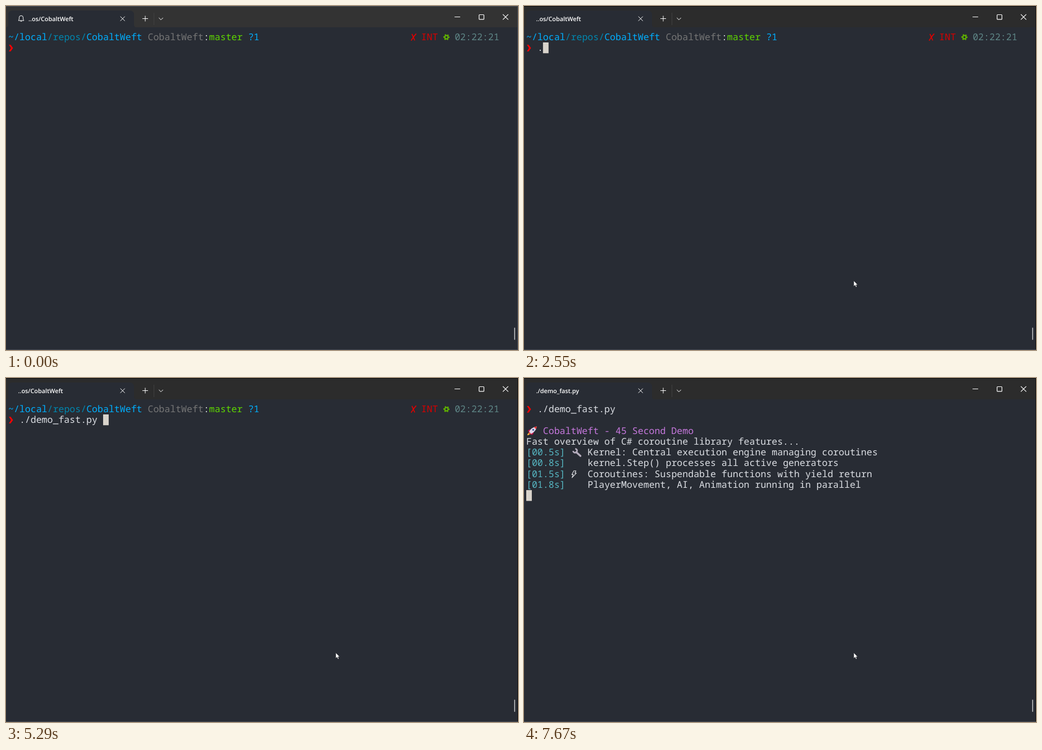
Animation, 912 px wide and 614 px high, one loop 8 s. Source, as an HTML page:

```html
<!DOCTYPE html>
<html lang="en">
<head>
<meta charset="utf-8">
<title>Terminal demo</title>
<style>
  html, body { margin: 0; width: 100%; height: 100%; overflow: hidden; background: #282c34; }
  svg { display: block; width: 912px; height: 614px; }
  text { text-rendering: geometricPrecision; white-space: pre; }
  .mono { font: 500 16.57px "Noto Sans Mono", "DejaVu Sans Mono", monospace; }
  .tab { font: 600 10.8px "Open Sans", "Noto Sans", sans-serif; fill: #fff; }
  .line { fill: none; stroke: #fff; stroke-width: 1; }
</style>
</head>
<body>
<svg id="stage" viewBox="0 0 912 614" xmlns="http://www.w3.org/2000/svg">
  <defs>
    <path id="chevron" d="M1.2 4.2H4.3L8.5 10.1L4.3 16H1.2L4.9 10.1Z" fill="#f00"/>
    <g id="rocket">
      <path d="M3.2 14.6Q1.8 16 2 18Q4.4 18 6.6 15.6L5 13.6Z" fill="#fcb13f"/>
      <path d="M8 7.4Q4.8 7 2.6 10.8L6 11.2Z" fill="#ca0b4a"/>
      <path d="M13 12.2Q13.6 15.4 9.6 17.8L9 14.2Z" fill="#ca0b4a"/>
      <path d="M5 12Q8.6 3.8 18.6 2.2Q17.6 11 8.6 15.6Z" fill="#e1d8ec"/>
      <path d="M13.8 3.6Q16 2.4 18.6 2.2Q18.4 4.8 17.2 7Z" fill="#f8312f"/>
      <circle cx="12.4" cy="8.2" r="1.8" fill="#46619a"/>
      <path d="M4.6 11.4L9.2 16L7.4 16.4L4.2 13.2Z" fill="#f8312f"/>
    </g>
    <g id="wrench" fill="none" stroke="#b4acbc">
      <path d="M9.4 9.4L17 16.2" stroke-width="3.4" stroke-linecap="round"/>
      <path d="M7.7 3.4A3.5 3.5 0 1 1 4 7.2" stroke-width="2.8"/>
    </g>
    <path id="bolt" d="M5.2 4.2H9L7.2 8.2H9.8L2 16.4L4.3 10.9H1.7Z" fill="none" stroke="#e6e8ec" stroke-width="1.1" stroke-linejoin="round"/>
    <path id="cross" d="M3.4 4.2L8.4 15.8M11 3.6Q6.4 8.6 2 16" fill="none" stroke="#e00000" stroke-width="1.7"/>
    <g id="gear" stroke="#5faf00" fill="none">
      <circle cx="5.2" cy="10" r="3" stroke-width="2.3"/>
      <circle cx="5.2" cy="10" r="4.7" stroke-width="1.8" stroke-dasharray="2.46 2.46" transform="rotate(-15 5.2 10)"/>
    </g>
  </defs>

  <rect width="912" height="614" fill="#282c34"/>
  <rect id="bar" width="912" height="38"/>
  <path d="M0 38Q4 38 4 33V16Q4 8 12 8H220Q228 8 228 16V33Q228 38 232 38Z" fill="#282c34"/>
  <path d="M0 613.5H912" stroke="#454a54"/>
  <path id="edge" d="M0 .5H911.5V613" fill="none"/>
  <path d="M263.5 12V34" stroke="#404040"/>
  <g class="line">
    <path id="bell" d="M22.2 26H31.8L30.6 23.6V20.8A3.6 3.6 0 0 0 23.4 20.8V23.6ZM25.5 26.4A1.6 1.6 0 0 0 28.5 26.4"/>
    <path d="M203.7 18.7L211.7 26.7M211.7 18.7L203.7 26.7"/>
    <path d="M243 22.5H253M248 17.5V27.5"/>
    <path d="M272.3 21L276 24.7L279.7 21"/>
    <path d="M799 19.5H809"/>
    <rect x="842.7" y="15.5" width="8.6" height="8.4" rx="1" stroke-width="1.2"/>
    <path d="M885 14.8L894.6 24.4M894.6 14.8L885 24.4" stroke-width="1.2"/>
  </g>
  <text id="title" class="tab" y="27"></text>
  <rect x="905" y="574" width="2" height="22" rx="1" fill="#a0a2a6"/>
  <g id="screen" class="mono"></g>
  <rect id="caret" width="9.94" height="19.3" fill="#d8d3cb"/>
  <path id="mouse" d="M0 0V10.2L2.4 8L4 11.6L5.7 10.8L4.2 7.4H7.2Z" fill="#fff" stroke="#15171b" stroke-width=".6"/>
</svg>
<script>
const NS = "http://www.w3.org/2000/svg";
const LOOP = 8000, FOCUS = 740, RUN = 5950;
const CELL_W = 9.94, CELL_H = 19.3, LEFT = 4, TOP = 45.7;
const NAME = "CobaltWeft";
const WHITE = "#dcdfe4", BLUE = "#00afff", DIM = "#0087af", CYAN = "#56b6c2";

const $ = id => document.getElementById(id);
const colX = c => LEFT + c * CELL_W;
const rowY = r => TOP + r * CELL_H;
const show = (el, on) => el.setAttribute("visibility", on ? "visible" : "hidden");

function add(parent, tag, attrs = {}) {
  const el = document.createElementNS(NS, tag);
  for (const k in attrs) el.setAttribute(k, attrs[k]);
  return parent.appendChild(el);
}

function write(parent, row, col, str, fill) {
  const el = add(parent, "text", { x: colX(col), y: rowY(row) + 15.2, fill });
  el.textContent = str;
  return el;
}

function icon(parent, row, col, id) {
  add(parent, "use", { href: "#" + id, transform: `translate(${colX(col)} ${rowY(row)})` });
}

// Groups that are visible from one time to another
const blocks = [];
function block(from, to, build) {
  const g = add($("screen"), "g");
  build(g);
  blocks.push({ g, from, to });
}

let command;
block(0, RUN, g => {
  let col = 0;
  const run = [["~/local", BLUE], ["/repos/", DIM], [NAME, BLUE], [" ", DIM],
    [NAME, "#767676"], [":", WHITE], ["master", "#5fd700"], [" ", DIM], ["?1", BLUE]];
  for (const [str, fill] of run) {
    write(g, 0, col, str, fill);
    col += str.length;
  }
  icon(g, 0, 72, "cross");
  write(g, 0, 74, "INT", "#d70000");
  icon(g, 0, 78, "gear");
  write(g, 0, 80, "02:22:21", "#5f8787");
  icon(g, 1, 0, "chevron");
  command = write(g, 1, 2, "", WHITE);
});

block(RUN, LOOP, g => {
  icon(g, 0, 0, "chevron");
  write(g, 0, 2, "./demo_fast.py", WHITE);
  icon(g, 2, 0, "rocket");
  write(g, 2, 3, NAME + " - 45 Second Demo", "#c678dd");
  write(g, 3, 0, "Fast overview of C# coroutine library features...", WHITE);
});

const log = [
  [6550, "00.5s", "Kernel: Central execution engine managing coroutines", "wrench"],
  [6760, "00.8s", "kernel.Step() processes all active generators"],
  [7400, "01.5s", "Coroutines: Suspendable functions with yield return", "bolt"],
  [7670, "01.8s", "PlayerMovement, AI, Animation running in parallel"]
];
log.forEach(([from, stamp, str, mark], i) => block(from, LOOP, g => {
  write(g, 4 + i, 0, `[${stamp}]`, CYAN);
  if (mark) icon(g, 4 + i, 8, mark);
  write(g, 4 + i, 11, str, WHITE);
}));

const typing = [[0, ""], [2550, "."], [2640, "./"], [3220, "./D"], [3420, "./De"],
  [3690, "./demo"], [5080, "./demo_"], [5290, "./demo_fast.py "]];

// Caret: time, then column and row, or nothing while blinked off
const caret = [[0], [FOCUS, 2, 1], [1250], [1760, 2, 1], [2550, 3, 1], [2640, 4, 1],
  [3220, 5, 1], [3420, 6, 1], [3690, 8, 1], [4350], [4680, 8, 1], [5080, 9, 1],
  [5290, 17, 1], [RUN, 0, 4], [6480], [6550, 0, 5], [6760, 0, 6], [7140],
  [7400, 0, 7], [7670, 0, 8]];

const latest = (list, t) => list.filter(e => e[0] <= t).pop();

function drawMouse(t) {
  const p = Math.min(1, Math.max(0, Math.floor((t - 200) / 77.5 + 1) / 7));
  const rest = (1 - p) ** 2;
  show($("mouse"), t >= 200);
  $("mouse").setAttribute("transform", `translate(${587.3 + 315 * rest} ${490.3 + 100 * rest})`);
}

function drawWindow(t) {
  const active = t >= FOCUS;
  const k = Math.min(1, Math.max(0, (t - FOCUS) / 80));
  const shade = Math.round(51 - 7 * k);
  $("bar").setAttribute("fill", `rgb(${shade},${shade},${shade})`);
  $("edge").setAttribute("stroke", active ? "#0c0c0d" : "#4b515c");
  show($("bell"), !active);
  $("title").setAttribute("x", active ? 21.5 : 40);
  $("title").textContent = t < RUN ? "..os/" + NAME : "./demo_fast.py";
}

function render(t) {
  drawWindow(t);
  drawMouse(t);
  for (const b of blocks) show(b.g, t >= b.from && t < b.to);
  command.textContent = latest(typing, t)[1];
  const [, col, row] = latest(caret, t);
  show($("caret"), row !== undefined);
  if (row !== undefined) {
    $("caret").setAttribute("x", colX(col));
    $("caret").setAttribute("y", rowY(row));
  }
}

const start = performance.now();
function tick() {
  render((performance.now() - start) % LOOP);
  requestAnimationFrame(tick);
}
tick();
</script>
</body>
</html>
```
